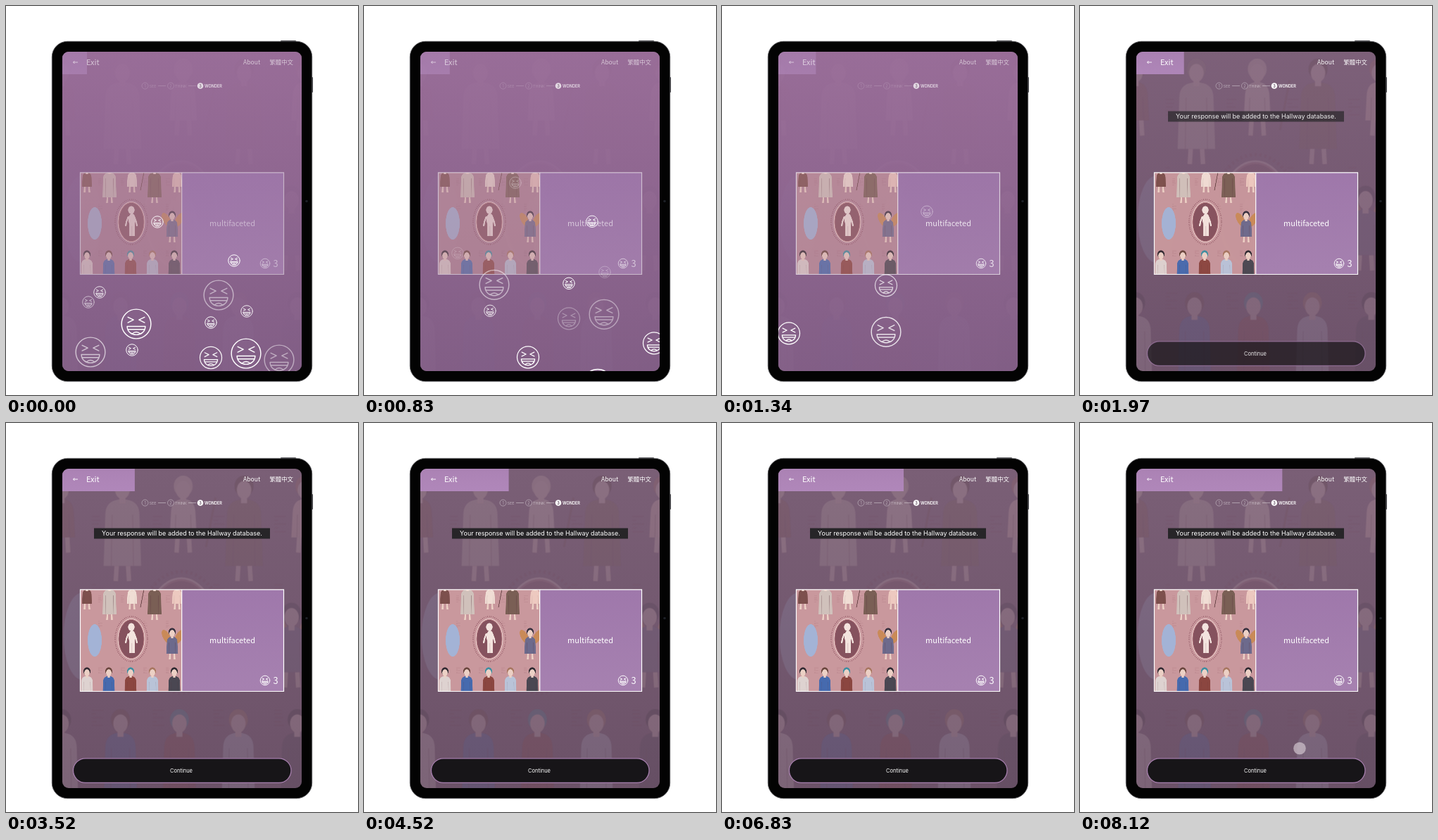
Write an HTML page with a canvas that moves like this. It is 500 px wide and 553 px high and loops after 8160 ms.

```html
<!DOCTYPE html>
<html lang="en">
<head>
<meta charset="utf-8">
<style>
html, body { margin: 0; width: 500px; height: 553px; overflow: hidden; background: #fff; }
canvas { display: block; }
</style>
</head>
<body>
<canvas id="stage" width="500" height="553"></canvas>
<script>
const LOOP = 8160, ZOOM = 2.7, FADE = 480;
const SANS = '"Noto Sans CJK TC", "Noto Sans", sans-serif', UI = 'Inter, sans-serif';
const SKIN = '#ecd0c5';
const ctx = document.getElementById('stage').getContext('2d');
const clamp = v => Math.max(0, Math.min(1, v));

function shape(c, fill, build) {
  c.beginPath();
  build(c);
  c.fillStyle = fill;
  c.fill();
}
const oval = (c, fill, x, y, rx, ry = rx, tilt = 0) =>
  shape(c, fill, p => p.ellipse(x, y, rx, ry, tilt, 0, 7));
const box = (c, fill, x, y, w, h, r = 0) => shape(c, fill, p => p.roundRect(x, y, w, h, r));

function line(c, color, width, ...points) {
  c.beginPath();
  points.forEach(([x, y]) => c.lineTo(x, y));
  c.strokeStyle = color;
  c.lineWidth = width;
  c.stroke();
}

function outline(color, width) {
  ctx.strokeStyle = color;
  ctx.lineWidth = width;
  ctx.stroke();
}

function gradient(top, bottom, y0, y1) {
  const g = ctx.createLinearGradient(0, y0, 0, y1);
  g.addColorStop(0, top);
  g.addColorStop(1, bottom);
  return g;
}

function text(str, x, y, size, family, weight = 400, align = 'left', color = '#fff') {
  ctx.font = `${weight} ${size}px ${family}`;
  ctx.textAlign = align;
  ctx.fillStyle = color;
  ctx.fillText(str, x, y);
}

// Faceless figure: head at (x, y), robe down to the hem
function figure(c, x, y, hair, robe, width, height) {
  const w = width / 2, hem = y + height;
  shape(c, robe, p => {
    p.moveTo(x - 2, y + 6);
    p.quadraticCurveTo(x - w, y + 7, x - w, y + 14);
    p.lineTo(x - w * 1.1, hem);
    p.lineTo(x + w * 1.1, hem);
    p.lineTo(x + w, y + 14);
    p.quadraticCurveTo(x + w, y + 7, x + 2, y + 6);
  });
  for (const side of [-1, 1]) {
    line(c, 'rgba(90,50,60,.35)', .5, [x + side * w * .6, y + 14], [x + side * w * .65, hem]);
    line(c, SKIN, 2.4, [x + side * 3, hem], [x + side * 3.5, hem + 8]);
  }
  oval(c, hair, x, y - 1, 5, 5.6);
  box(c, SKIN, x - 1.6, y + 3, 3.2, 5);
  oval(c, SKIN, x, y + 1, 3.8, 4.8);
}

const crowd = {
  top: [['#5a3a38', '#7d504d'], ['#8f7b78', '#d0c1bb'], ['#d9c3ba', '#f0ddd4'],
    ['#49302d', '#7a5f55'], ['#a66c62', '#edc9c0']],
  bottom: [['#332b33', '#ded2d0'], ['#6b473f', '#466aae'], ['#3e8ea1', '#8b4640'],
    ['#a87761', '#b9c3d8'], ['#2e2a31', '#4a4752']]
};

function medallion(c) {
  const x = 178, y = 307, pale = '#f3e3de';
  c.setLineDash([.9, 1.7]);
  c.beginPath();
  c.ellipse(x, y, 23, 32, 0, 0, 7);
  c.strokeStyle = 'rgba(120,60,75,.6)';
  c.lineWidth = 1.6;
  c.stroke();
  c.setLineDash([]);
  ['#e9cfcc', '#b77a82', '#85525e'].forEach((fill, i) => oval(c, fill, x, y, 19.5 - i, 29 - i));
  oval(c, pale, x, y - 17, 4.6, 5.6);
  oval(c, pale, x + 1, y - 3, 5, 9);
  for (const side of [-1, 1]) {
    line(c, pale, 2.2, [x + side * 4, y - 8], [x + side * 7, y], [x + side * 8, y + 6]);
    line(c, pale, 3.4, [x + 1 + side * 2, y + 3], [x + 1 + side * 2, y + 20]);
  }
}

function paintArt() {
  const canvas = document.createElement('canvas');
  canvas.width = 392;
  canvas.height = 473;
  const c = canvas.getContext('2d');
  c.setTransform(ZOOM, 0, 0, ZOOM, -106 * ZOOM, -220 * ZOOM);

  // Captions as small strokes
  for (let x = 131; x < 240; x += 32)
    for (const y of [246, 282, 348])
      for (let i = 0; i < 5; i++)
        line(c, 'rgba(120,60,75,.5)', .5, [x, y + i * 2], [x + 4 + 2 * Math.sin(x + y + i * 3), y + i * 2]);

  crowd.top.forEach(([hair, robe], i) =>
    figure(c, 115 + 32 * i, 231, hair, robe, 13 + i % 2 * 5, 26 + i % 2 * 15));
  crowd.bottom.forEach(([hair, robe], i) => figure(c, 115 + 31 * i, 354, hair, robe, 16, 42));
  line(c, '#6f4a4c', 1, [196, 236], [191, 262]);

  oval(c, '#a3b3d6', 126, 309, 10, 23);
  for (const side of [-1, 1]) oval(c, '#c98a58', 237 + side * 9, 304, 5, 11, side * .5);
  figure(c, 236, 298, '#38313f', '#6d6a8c', 15, 30);
  medallion(c);
  return canvas;
}
const art = paintArt();

function laugh(x, y, r, alpha) {
  if (alpha <= 0) return;
  ctx.save();
  ctx.globalAlpha = clamp(alpha);
  ctx.translate(x, y);
  ctx.scale(r, r);
  ctx.lineJoin = ctx.lineCap = 'round';
  ctx.beginPath();
  ctx.arc(0, 0, .97, 0, 7);
  for (const s of [-1, 1]) {
    ctx.moveTo(s * .55, -.45);
    ctx.lineTo(s * .18, -.27);
    ctx.lineTo(s * .55, -.09);
  }
  ctx.moveTo(-.6, .16);
  ctx.lineTo(.6, .16);
  ctx.bezierCurveTo(.58, .9, -.58, .9, -.6, .16);
  ctx.moveTo(-.54, .36);
  ctx.lineTo(.54, .36);
  ctx.moveTo(-.28, .66);
  ctx.quadraticCurveTo(0, .42, .28, .66);
  outline('#fff', (.7 + r * .035) / r);
  ctx.restore();
}

// By radius: x, starting y, time gone
const laughs = {
  8.5: [[117, 421, 270], [133, 407, 390], [179, 489, 700], [291, 450, 1000],
    [342, 434, 430], [215, 307, 440], [324, 362, 740]],
  16: [[291, 500, 450], [412, 535, 780], [233, 555, 1150], [95, 623, 1300]],
  21.5: [[185, 452, 550], [120, 492, 300], [302, 411, 240], [341, 494, 500],
    [388, 503, 230], [332, 593, 790], [233, 621, 1200]]
};

function drawLaughs(run) {
  const rise = .1794 * run + 1.85e-5 * run * run;
  for (const [r, spots] of Object.entries(laughs))
    for (const [x, y, gone] of spots) laugh(x, y - rise, +r, (gone - run) / FADE);
}

function drawSteps(dim, bright) {
  const y = 113.5, base = 115.5;
  ctx.globalAlpha = dim;
  ['SEE', 'THINK'].forEach((label, i) => {
    const x = 197.5 + 36.5 * i, end = 216 + 43 * i;
    ctx.beginPath();
    ctx.arc(x, y, 4.5, 0, 7);
    outline('#fff', .7);
    text(i + 1, x, base, 5.5, UI, 400, 'center');
    text(label, x + 6, base, 5.4, UI);
    line(ctx, '#fff', .8, [end, y], [end + 11, y]);
  });
  ctx.globalAlpha = bright;
  oval(ctx, '#fff', 276, y, 4.3);
  text('3', 276, base, 5.5, UI, 600, 'center', '#594457');
  text('WONDER', 282, base, 5.5, UI, 600);
}

function drawDevice() {
  box(ctx, '#3c3c3f', 390, 49, 22, 3, 1);
  box(ctx, '#3c3c3f', 433.5, 101, 2.5, 22, 1);
  box(ctx, '#030303', 65.3, 50.3, 369.4, 483.4, 22);
  outline('#5c5c5f', .9);
  oval(ctx, '#1d2026', 427, 277.5, 1.8);
}

function drawHeader(run, alpha) {
  ctx.globalAlpha = alpha;
  box(ctx, gradient('#ab82b4', '#b087ba', 65, 97), 80, 65, 35 + .0227 * run, 32);
  line(ctx, '#fff', .9, [102, 80], [95.5, 80]);
  line(ctx, '#fff', .9, [97.5, 78], [95.5, 80], [97.5, 82]);
  text('Exit', 114, 84, 10.9, SANS, 500);
  text('About', 337, 83, 8.6, SANS, 500);
  text('繁體中文', 374.5, 83, 8.4, SANS, 500);
}

function drawCard(photoAlpha, panelAlpha, labelAlpha) {
  ctx.globalAlpha = photoAlpha;
  box(ctx, '#c9989d', 106, 237, 144, 144);
  ctx.save();
  ctx.clip();
  ctx.drawImage(art, 106, 220, art.width / ZOOM, art.height / ZOOM);
  ctx.restore();
  ctx.globalAlpha = panelAlpha;
  box(ctx, gradient('#9f78ab', '#a681b0', 237, 381), 250, 237, 144, 144);
  ctx.globalAlpha = photoAlpha;
  box(ctx, 'transparent', 105.5, 236.8, 289, 144.7);
  outline('#fff', 1.2);
  line(ctx, '#fff', 1.2, [249.7, 237], [249.7, 381]);
  ctx.globalAlpha = labelAlpha;
  text('multifaceted', 321.5, 313, 11, SANS, 500, 'center');
  text('3', 383, 371, 12.8, SANS, 400, 'center');
  laugh(368, 366, 7, labelAlpha);
}

function drawMessage(boxAlpha, textAlpha) {
  ctx.globalAlpha = boxAlpha;
  box(ctx, '#272528', 125, 149.5, 250, 15);
  box(ctx, '#171518', 95.5, 476.8, 309.5, 34.6, 17.3);
  outline('#a980b0', 1.2);
  ctx.globalAlpha = textAlpha;
  text('Your response will be added to the Hallway database.', 250, 160.2, 9, UI, 400, 'center');
  text('Continue', 249, 496.6, 7.5, UI, 400, 'center');
}

function draw(t) {
  // The motion stalls briefly after the loop restarts
  const run = t < 100 ? 0 : t < 210 ? 30 : t < 590 ? 60 : t - 530;
  const fade = clamp((t - 1410) / 800), ease = 1 - (1 - fade) ** 2;
  const reveal = from => from + (1 - from) * ease;
  const warm = Math.min(run, 810);

  ctx.globalAlpha = 1;
  ctx.clearRect(0, 0, 500, 553);
  drawDevice();

  ctx.save();
  box(ctx, gradient('#7a5f76', '#6c5268', 65, 519), 80, 65, 340, 454, 9);
  ctx.clip();
  ctx.globalAlpha = .15;
  ctx.drawImage(art, 54.6, 62.7);
  ctx.globalAlpha = .87 * (1 - ease);
  box(ctx, gradient('#9d6f9d', '#85608a', 65, 519), 80, 65, 340, 454);

  drawHeader(run, reveal(.62));
  drawSteps(.2 + .3 * ease, reveal(.75));
  drawCard(reveal(.5 + .00022 * warm), reveal(.85), reveal(.45 + .00043 * warm));
  drawMessage(fade, ease);
  drawLaughs(run);

  // Touch point
  if (t >= 8070) {
    ctx.globalAlpha = t < 8115 ? .35 : .7;
    oval(ctx, '#d0c4cd', 312, 462.5, 8.8);
  }
  ctx.restore();
}

function tick() {
  draw(performance.now() % LOOP);
  requestAnimationFrame(tick);
}
tick();
</script>
</body>
</html>
```
